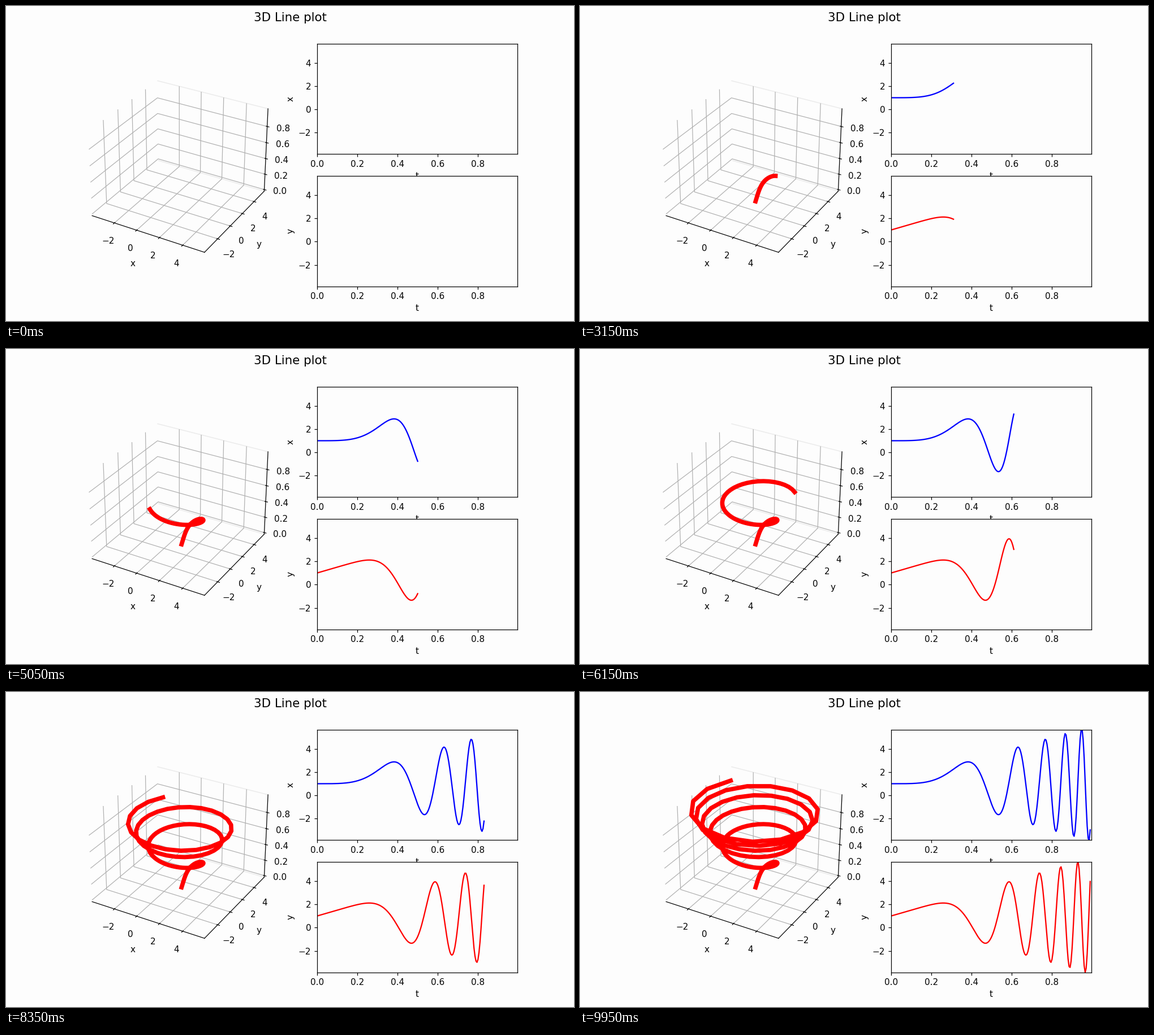
A matplotlib script that plays this animation: 1004x558 px, repeating every 10000 ms.

```python
import numpy as np
import matplotlib.pyplot as plt
from matplotlib.animation import FuncAnimation

WIDTH, HEIGHT, DPI = 1004, 558, 110
FRAMES, INTERVAL = 200, 50
BACKGROUND = "#fdfdfd"
PANE_EDGE = "#ebebeb"

plt.rcParams.update({
    "font.family": "DejaVu Sans",
    "figure.facecolor": BACKGROUND,
    "axes.facecolor": BACKGROUND,
})

# A spiral that widens and spins faster as it climbs.
t = np.arange(FRAMES) / FRAMES
phase = 10 * np.pi * t**3
x = 1 + 5 * t * np.sin(phase)
y = 1 + 5 * t * np.cos(phase)


def span(values):
    return values.min(), values.max()


def add_plot(position, values, label, color):
    ax = fig.add_subplot(2, 2, position)
    ax.set(xlim=span(t), ylim=span(values), xlabel="t", ylabel=label)
    return ax.plot([], [], color=color, lw=1.5)[0]


def add_space(position):
    ax = fig.add_subplot(1, 2, position, projection="3d")
    ax.set(xlabel="x", ylabel="y")
    ax.set_xticks([-2, 0, 2, 4])
    ax.set_yticks([-2, 0, 2, 4])
    ax.set_zticks(np.arange(5) / 5)
    limits = (ax.set_xlim, x), (ax.set_ylim, y), (ax.set_zlim, t)
    for set_limits, values in limits:
        set_limits(*span(values), view_margin=1 / 48)
    for axis in (ax.xaxis, ax.zaxis):
        axis.pane.set(facecolor="none", edgecolor="none")
    ax.yaxis.pane.set(facecolor="none", edgecolor=PANE_EDGE, alpha=None)
    return ax.plot([], [], [], color="red", lw=5)[0]


# The tiny surplus keeps the pixel size from rounding down.
fig = plt.figure(figsize=((WIDTH + 1e-6) / DPI, (HEIGHT + 1e-6) / DPI), dpi=DPI)
fig.suptitle("3D Line plot", fontsize=14)
spiral = add_space(1)
x_line = add_plot(2, x, "x", "blue")
y_line = add_plot(4, y, "y", "red")


def update(frame):
    shown = slice(0, frame)
    spiral.set_data_3d(x[shown], y[shown], t[shown])
    x_line.set_data(t[shown], x[shown])
    y_line.set_data(t[shown], y[shown])
    return spiral, x_line, y_line


def init():
    return update(0)


anim = FuncAnimation(fig, update, frames=FRAMES, init_func=init,
                     interval=INTERVAL, repeat=True, repeat_delay=0)
plt.show()
```
